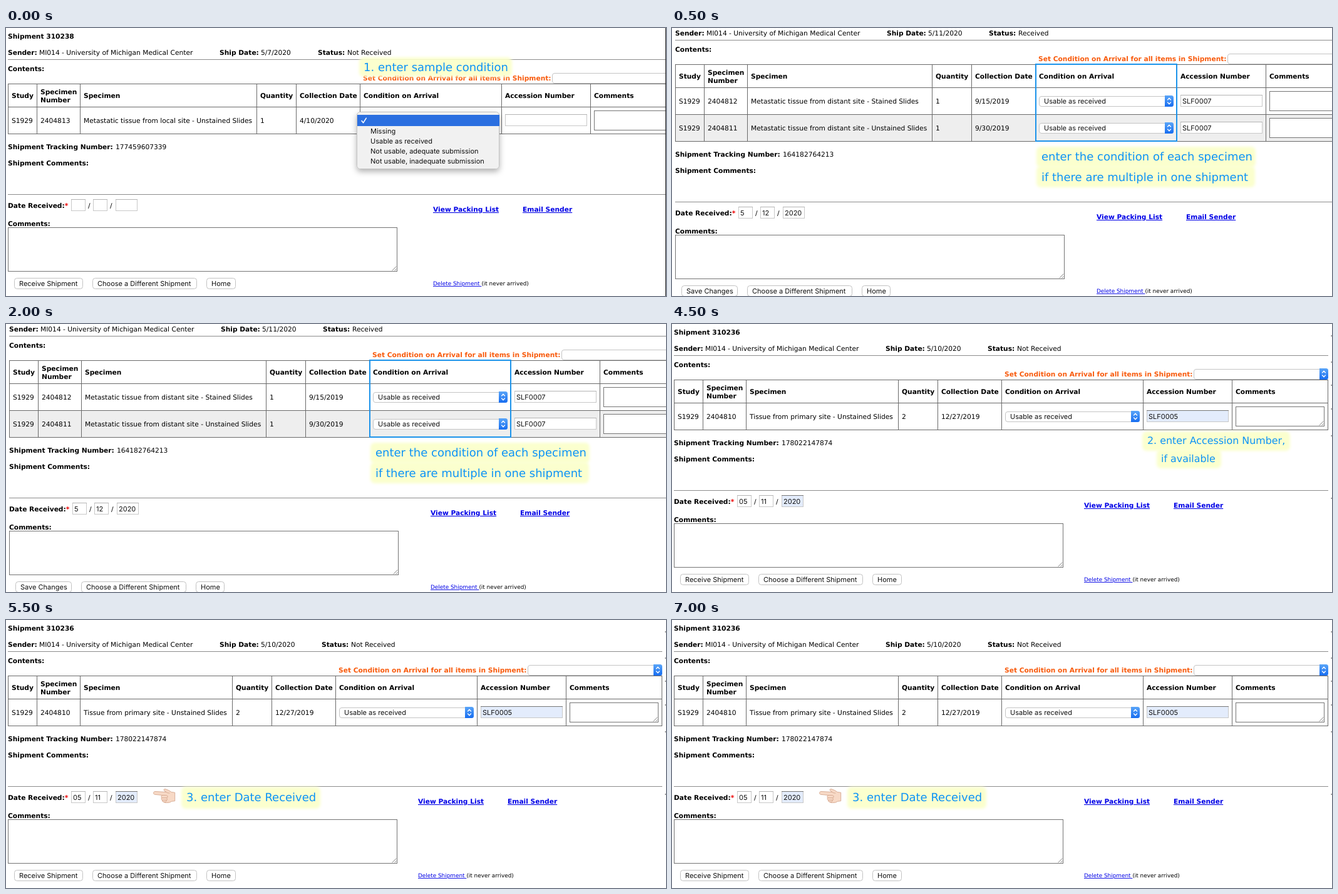
These frames come from a looping animation (1054 px wide and 429 px high, 8000 ms). An HTML page:

```html
<!DOCTYPE html>
<html lang="en">
<head>
<meta charset="utf-8">
<title>Receiving a specimen shipment</title>
<style>
html, body { margin: 0; width: 100%; height: 100%; overflow: hidden; background: #fff; }
svg { display: block; width: 1054px; height: 429px; }
text { font: 10.67px "DejaVu Sans", sans-serif; text-rendering: geometricPrecision; white-space: pre; }
.b { font-weight: bold; }
.orange { font-weight: bold; fill: #f85a0c; }
.link { font-weight: bold; fill: #0000e6; text-decoration: underline; }
.small { font-size: 8.9px; }
.ui { font: 11px Inter, sans-serif; fill: #111; }
.note { font-size: 18px; fill: #0d93f5; }
.note2 { font-size: 15.9px; fill: #0d93f5; }
</style>
</head>
<body>
<svg id="stage" viewBox="0 0 1054 429">
  <defs>
    <filter id="soft" x="-10%" y="-40%" width="120%" height="180%"><feGaussianBlur stdDeviation="2"/></filter>
    <filter id="shade" x="-10%" y="-20%" width="120%" height="150%">
      <feDropShadow dx="0" dy="4" stdDeviation="5" flood-color="#000" flood-opacity=".3"/>
    </filter>
    <linearGradient id="blue" x1="0" y1="0" x2="0" y2="1">
      <stop offset="0" stop-color="#5aa5f8"/><stop offset="1" stop-color="#176df0"/>
    </linearGradient>
  </defs>
</svg>
<script>
const LINE = "#6a6a6a", TINT = "#e3ecfc";

const text = (x, y, s, cls = "") => `<text x="${x}" y="${y}" class="${cls}">${s}</text>`;
const bold = (x, y, s) => text(x, y, s, "b");
const fill = (x, y, w, h, c, rx = 0) => `<rect x="${x}" y="${y}" width="${w}" height="${h}" rx="${rx}" fill="${c}"/>`;
const path = (d, stroke, w = 1, fillColor = "none") =>
  `<path d="${d}" fill="${fillColor}" stroke="${stroke}" stroke-width="${w}" stroke-linecap="round" stroke-linejoin="round"/>`;

// Outline on whole pixels, from (x, y) to (x2, y2)
const box = (x, y, x2, y2, stroke, bg = "#fff", rx = 0) =>
  `<rect x="${x + .5}" y="${y + .5}" width="${x2 - x}" height="${y2 - y}" rx="${rx}" fill="${bg}" stroke="${stroke}"/>`;
const hline = (x, x2, y, c = LINE) => fill(x, y, x2 - x, 1, c);
const vline = (x, y, y2, c = LINE) => fill(x, y, 1, y2 - y, c);

function field(x, y, w, value = "", tinted = false) {
  return box(x, y, x + w, y + 18, "#c8c8c8", tinted ? TINT : "#fff") +
    hline(x, x + w + 1, y, tinted ? "#777" : "#b4b4b4") +
    text(x + 3, y + 14, value, "ui");
}

function area(x, y, x2, y2) {
  return box(x, y, x2, y2, "#747474") +
    path(`M${x2 - 7} ${y2 - 1}l6 -6M${x2 - 3} ${y2 - 1}l2 -2`, "#777", .9);
}

function select(x, y, x2, value = "") {
  const a = x2 - 7;
  return box(x, y + 1, x2 - 1, y + 17, "#c4c4c4", "#fff", 3.5) +
    `<path d="M${x2 - 14} ${y}h10.5q3.5 0 3.5 3.5v11q0 3.5 -3.5 3.5h-10.5z" fill="url(#blue)"/>` +
    path(`M${a - 2.5} ${y + 7}l2.5 -2.7l2.5 2.7M${a - 2.5} ${y + 11}l2.5 2.7l2.5 -2.7`, "#fff", 1.3) +
    text(x + 8, y + 13, value, "ui");
}

const button = (x, y, x2, label) =>
  box(x, y, x2, y + 17, "#c2c2c2", "#fff", 4) + text(x + 8, y + 13, label, "ui");

const glow = (x, y, x2, y2) =>
  `<rect x="${x}" y="${y}" width="${x2 - x}" height="${y2 - y}" rx="7" fill="#fbffcc" fill-opacity=".95" filter="url(#soft)"/>`;

function table(p) {
  const { cols, right, rows } = p, x = cols[0], top = 89 + p.dy;
  const bottom = top + 37 + 43 * rows.length;
  const heads = ["Study", "", "Specimen", "Quantity", "Collection Date", "Condition on Arrival", "Accession Number", "Comments"];
  let s = rows.length > 1 ? fill(x, top + 80, right - x, 43, "#eeeeee") : "";
  s += hline(x, right, top);
  for (let i = 0; i <= rows.length; i++) s += hline(x, right, top + 37 + 43 * i);
  cols.forEach((c, i) => s += vline(c, top, bottom) + bold(c + 6, top + 23, heads[i]));
  if (right < 1054) s += vline(right - 1, top, bottom);
  s += bold(cols[1] + 6, top + 17, "Specimen") + bold(cols[1] + 6, top + 30, "Number");
  rows.forEach((row, i) => {
    const y = top + 37 + 43 * i;
    ["S1929", row.id, row.name, row.count, row.date].forEach((v, k) => s += text(cols[k] + 6, y + 26, v));
    if (row.state) s += select(cols[5] + 6, y + 13, cols[5] + 221, row.state);
    s += field(cols[6] + 6, y + 12, 130, row.code, p.tinted);
    s += area(cols[7] + 6, y + 6, p.areaEnd, y + 37);
  });
  return s;
}

function page(p) {
  const x = p.x, y = p.dy, low = p.low, right = p.right;
  let s = fill(0, 0, 1054, 429, "#fff");
  s += bold(x, 17 + y, "Shipment " + p.number);
  s += bold(x, 43 + y, "Sender:") + text(x + 50, 43 + y, "MI014 - University of Michigan Medical Center");
  s += bold(x + 338, 43 + y, "Ship Date:") + text(x + 404, 43 + y, p.shipped);
  s += bold(p.statusX, 43 + y, "Status:") + text(p.statusX + 47, 43 + y, p.status);
  s += hline(x, right, 50 + y, "#8c8c8c") + bold(x, 69 + y, "Contents:");
  s += text(p.cols[5] + 5, 84 + y, "Set Condition on Arrival for all items in Shipment:", "orange");
  s += select(p.cols[5] + 307, 71 + y, p.cols[5] + 522);
  s += table(p);
  s += bold(x, 194 + low, "Shipment Tracking Number:") + text(x + 172, 194 + low, p.tracking);
  s += bold(x, 220 + low, "Shipment Comments:");
  s += hline(x, right, 266 + low, "#8c8c8c");
  s += bold(x, 288 + low, 'Date Received:<tspan fill="#e00">*</tspan>');
  const [m, d, yr] = p.received, fy = 274 + low;
  s += field(x + 101, fy, 22, m) + text(x + 128, 288 + low, "/");
  s += field(x + 136, fy, 22, d) + text(x + 163, 288 + low, "/");
  s += field(x + 172, fy, 34, yr, p.tinted);
  s += text(p.linkX, 294 + low, "View Packing List", "link") + text(p.linkX + 143, 294 + low, "Email Sender", "link");
  s += bold(x, 317 + low, "Comments:") + area(x, 319 + low, x + 621, 389 + low);
  p.buttons.forEach(b => s += button(b[0], 400 + low, b[1], b[2]));
  s += text(p.linkX, 412 + low,
    '<tspan fill="#0000e6" text-decoration="underline">Delete Shipment </tspan>(it never arrived)', "small");
  return s;
}

const mainButtons = [[13, 122, "Receive Shipment"], [138, 304, "Choose a Different Shipment"], [320, 366, "Home"]];

function menu() {
  const items = ["Missing", "Usable as received", "Not usable, adequate submission", "Not usable, inadequate submission"];
  return `<rect x="560.5" y="134.5" width="227" height="91" rx="5" fill="#f1f1f1" stroke="#c3c3c3" filter="url(#shade)"/>` +
    fill(561, 139, 227, 18, "#2b6fe0") +
    path("M568 148.5l2.6 3.2l4.6 -7.4", "#fff", 1.6) +
    items.map((v, i) => text(582, 169 + 16 * i, v, "ui")).join("");
}

function hand() {
  const skin = "#f7d9c6", edge = "#d5a78f";
  return path("M236 275.5q-1.6 2.8 1.5 3.8l12 1.2q-3 2 -1 4q-1.4 2.2 .8 3.8q-.4 2.4 2.4 3q1 1.5 5 1.2q5 .3 8 -2.2l5 -.6v-13.5l-5.500 -.7q-4.500 -3.500 -9 -4.700q-3 -.8 -3.300 1q.2 1.800 4 3.700l-17.500 -1z", edge, .9, skin) +
    path("M249.500 280.500l7 .2q2.500 .8 1.500 3.200q-1 1 -3 .8h-5.800M256.500 285q2 1.300 .5 3.200l-7.200 .2M256 288.500q1 1.800 -1 2.700h-3.200M255.500 275.500q2.500 1.800 5.500 1.700", edge, .9);
}

// Bits of a neighbouring window at the right edge
const edgeBits = [18, 60, 97, 135, 178, 278].map(y => fill(1052.5, y, 1.5, 2, "#888")).join("");

const first = page({
  x: 3, dy: 0, low: 0, right: 1054, number: "310238", shipped: "5/7/2020", statusX: 498, status: "Not Received",
  cols: [3, 49, 118, 400, 463, 565, 791, 933], areaEnd: 1081,
  rows: [{ id: "2404813", name: "Metastatic tissue from local site - Unstained Slides", count: 1, date: "4/10/2020", code: "" }],
  tracking: "177459607339", received: ["", "", ""], linkX: 682, buttons: mainButtons
}) + vline(1053, 0, 429, "#222") + menu() + glow(564, 47, 808, 78) + text(571, 69, "1. enter sample condition", "note");

const second = page({
  x: 5, dy: -31, low: 12, right: 1054, number: "310237", shipped: "5/11/2020", statusX: 506, status: "Received",
  cols: [5, 51, 120, 415, 478, 580, 806, 948], areaEnd: 1096,
  rows: [
    { id: "2404812", name: "Metastatic tissue from distant site - Stained Slides", count: 1, date: "9/15/2019", state: "Usable as received", code: "SLF0007" },
    { id: "2404811", name: "Metastatic tissue from distant site - Unstained Slides", count: 1, date: "9/30/2019", state: "Usable as received", code: "SLF0007" }
  ],
  tracking: "164182764213", received: ["5", "12", "2020"], linkX: 678,
  buttons: [[15, 104, "Save Changes"], [120, 287, "Choose a Different Shipment"], [303, 348, "Home"]]
}) + `<rect x="581" y="58" width="225" height="123" fill="none" stroke="#1c93ea" stroke-width="2"/>` +
  glow(582, 190, 932, 223) + glow(582, 221, 931, 255) +
  text(590, 212, "enter the condition of each specimen", "note") +
  text(590, 245, "if there are multiple in one shipment", "note");

const third = page({
  x: 3, dy: 0, low: 0, right: 1048, number: "310236", shipped: "5/10/2020", statusX: 504, status: "Not Received",
  cols: [3, 49, 118, 361, 424, 526, 752, 894], areaEnd: 1041, tinted: true,
  rows: [{ id: "2404810", name: "Tissue from primary site - Unstained Slides", count: 2, date: "12/27/2019", state: "Usable as received", code: "SLF0005" }],
  tracking: "178022147874", received: ["05", "11", "2020"], linkX: 658, buttons: mainButtons
}) + edgeBits;

const accession = glow(751, 172, 987, 203) + glow(774, 201, 877, 231) +
  text(759, 192, "2. enter Accession Number,", "note2") + text(781, 221, "if available", "note2");
const received = hand() + glow(280, 267, 502, 302) + text(288, 290, "3. enter Date Received", "note");

const scenes = [[0, first], [500, second], [3000, third + accession], [5500, third + received]];
const stage = document.getElementById("stage");
stage.insertAdjacentHTML("beforeend", scenes.map(s => `<g class="scene" display="none">${s[1]}</g>`).join(""));
const groups = stage.querySelectorAll(".scene");

const start = performance.now();
let shown = -1;
function render(now) {
  const t = Math.max(0, now - start) % 8000;
  const n = scenes.filter(s => s[0] <= t).length - 1;
  if (n !== shown) {
    groups.forEach((g, i) => g.setAttribute("display", i === n ? "inline" : "none"));
    shown = n;
  }
  requestAnimationFrame(render);
}
render(start);
</script>
</body>
</html>
```
